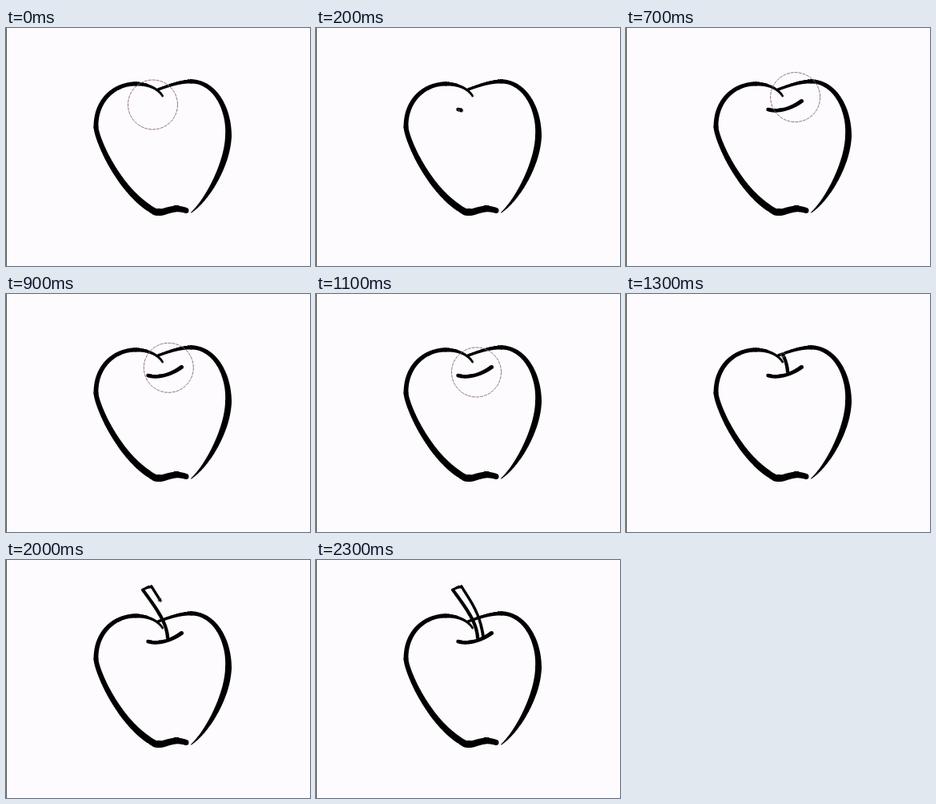
Animation, 380 px wide and 298 px high, one loop 2400 ms. Source, as an HTML page with a canvas:

```html
<!DOCTYPE html>
<html lang="en">
<head>
<meta charset="utf-8">
<title>Drawing an apple</title>
<style>
  html, body { margin: 0; width: 100%; height: 100%; overflow: hidden; background: #fdfbfe; }
  canvas { display: block; }
</style>
</head>
<body>
<canvas id="stage" width="380" height="298"></canvas>
<script>
const ctx = document.getElementById('stage').getContext('2d');
const STEP = 100, STEPS = 24;

// A stroke is a cubic curve whose width runs between two values.
// Times are in steps.
const stroke = (curve, widths, start = -1, duration = 1) => ({ curve, widths, start, duration });

const strokes = [
  // left side
  stroke([[195.5, 85], [190, 76], [178, 70], [162, 70]], [3, 5]),
  stroke([[162, 70], [134, 70], [112, 92], [112.5, 124]], [5, 6]),
  stroke([[112.5, 124], [113, 138], [140, 204], [186, 230]], [6, 8.5]),
  stroke([[186, 230], [198, 234], [206, 222], [225, 228.5]], [8.5, 7]),
  // right side
  stroke([[190, 77], [204, 72], [218, 67], [232, 67]], [3.5, 5]),
  stroke([[232, 67], [260, 67], [279, 100], [278, 135]], [5, 8]),
  stroke([[278, 135], [277, 170], [252, 215], [231.5, 231]], [8, 1]),
  // hollow, then the stem
  stroke([[177.5, 102], [189, 106], [207, 101], [219.5, 91.5]], [4.5, 5], 1.75, 2.4),
  stroke([[202, 97], [201, 78], [186, 58], [171, 37.5]], [4.5, 4], 11.85, 3.2),
  stroke([[171, 37.5], [174, 35], [178, 34], [182, 33.5]], [3, 3.5], 17.2, 1.6),
  stroke([[182, 33.5], [192, 50], [205, 66], [209, 96]], [3.5, 4], 18.6, 4.2)
];

const hovers = [
  { start: 0, end: 1, from: [183.5, 96], to: [177.5, 103.5] },
  { start: 5, end: 11, from: [225.5, 81], to: [200.5, 98] }
];

const clamp = v => Math.max(0, Math.min(1, v));
const mix = (a, b, u) => a + (b - a) * u;

function pointAt([a, b, c, d], u) {
  const v = 1 - u;
  return [0, 1].map(k =>
    v * v * v * a[k] + 3 * v * v * u * b[k] + 3 * v * u * u * c[k] + u * u * u * d[k]);
}

function brush({ curve, widths }, amount) {
  const count = Math.ceil(amount * 160);
  ctx.beginPath();
  for (let i = 0; i <= count; i++) {
    const u = amount * i / count;
    const [x, y] = pointAt(curve, u);
    const r = mix(...widths, u * u) / 2;
    ctx.moveTo(x + r, y);
    ctx.arc(x, y, r, 0, 2 * Math.PI);
  }
  ctx.fill();
}

// Blends by difference so the ring shows on both paper and ink
function ring(x, y, r) {
  ctx.save();
  ctx.globalCompositeOperation = 'difference';
  ctx.strokeStyle = '#6a8775';
  ctx.setLineDash([4, 1]);
  ctx.beginPath();
  ctx.arc(x, y, r, 0, 2 * Math.PI);
  ctx.stroke();
  ctx.restore();
}

function draw(step) {
  ctx.fillStyle = '#fdfbfe';
  ctx.fillRect(0, 0, 380, 298);
  ctx.fillStyle = '#555';
  ctx.fillRect(0, 0, 1, 298);
  ctx.fillStyle = '#000';
  for (const s of strokes) {
    const amount = clamp((step - s.start) / s.duration);
    if (!amount) continue;
    brush(s, amount);
    if (amount < 1) ring(...pointAt(s.curve, amount), 2.5);
  }
  for (const { start, end, from, to } of hovers) {
    if (step < start || step > end) continue;
    const u = (step - start) / (end - start);
    // sideways motion slows down, vertical motion is steady
    ring(mix(from[0], to[0], 1 - (1 - u) ** 2), mix(from[1], to[1], u), 31);
  }
}

const begin = performance.now();
function tick() {
  draw(Math.floor((performance.now() - begin) / STEP) % STEPS);
  requestAnimationFrame(tick);
}
tick();
</script>
</body>
</html>
```
